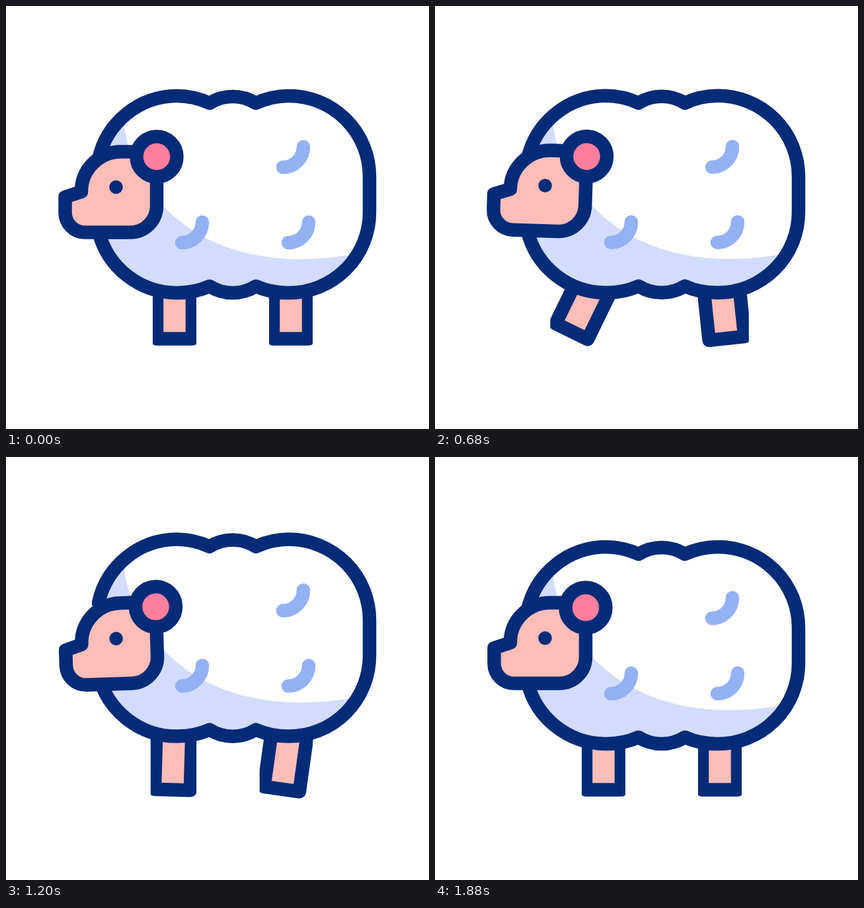
Recreate the animation shown at these times as an HTML page with a canvas. Size 640 px wide and 640 px high, loop 2000 ms.

```html
<!DOCTYPE html>
<html lang="en">
<head>
<meta charset="utf-8">
<title>Running sheep</title>
<style>
html, body { margin: 0; width: 100%; height: 100%; overflow: hidden; background: #fff; }
canvas { display: block; }
</style>
</head>
<body>
<canvas id="stage" width="640" height="640"></canvas>
<script>
const ctx = document.getElementById('stage').getContext('2d');
const NAVY = '#042b77', SKIN = '#fdbdb8', EAR = '#fe7f9f', SHADE = '#d2dcfd', CURL = '#94b1f4';
const LOOP = 2000, STEP = 40, LINE = 20.5;
const STRIDE = 600, SETOFF = 200, SETTLE = 1400, REST = 1880;

const bodyFill = new Path2D(`M140 341 A122 122 0 0 0 258 434 A122 122 0 0 0 308 424
  A66 66 0 0 0 378 424 A122 122 0 0 0 428 434 A122 122 0 0 0 550 312 V258
  A122 122 0 0 0 428 136 A122 122 0 0 0 378 147 A66 66 0 0 0 308 147
  A122 122 0 0 0 258 136 A122 122 0 0 0 140 232`);
const bodyLine = new Path2D('M140 305 V341');
bodyLine.addPath(bodyFill);
const shade = new Path2D(`M177 130 L178 170 C183 262 266 383 445 383
  C474 383 503 380 530 375 L560 460 H120 V130 Z`);
const curl = new Path2D('M31 0 A31 31 0 0 1 0 31');
const face = new Path2D(`M89.5 289 L114 281 A60 60 0 0 1 174 220.5 H228 V303
  A40 40 0 0 1 188 342.5 H119.5 A30 30 0 0 1 89.5 312.5 Z`);

// Rises from 0 to 1 and back once per stride
function hump(phase, start, length, power = 2) {
  const u = ((phase - start + STRIDE) % STRIDE) / length;
  return u < 1 ? Math.sin(Math.PI * u) ** power : 0;
}

// The gallop repeats each stride; it grows out of rest and fades back into it
function poseAt(t) {
  const phase = Math.min(SETTLE, Math.max(SETOFF, t)) % STRIDE;
  const strength = Math.max(0, Math.min(1, t / SETOFF, (REST - t) / (REST - SETTLE)));
  return {
    bodyY: strength * (39.5 * hump(phase, -22, 554) - 12),
    headTurn: strength * (15.8 * hump(phase, -5, 520) - 2),
    headY: strength * -12 * hump(phase, 355, 280),
    front: strength * 47 * hump(phase, -5, 455, 1),
    back: strength * (8 - 47 * hump(phase, 11, 375))
  };
}

function paint(path, fill) {
  ctx.fillStyle = fill;
  ctx.fill(path);
  ctx.stroke(path);
}

function disc(x, y, r, fill, outlined) {
  const path = new Path2D();
  path.arc(x, y, r, 0, 2 * Math.PI);
  ctx.fillStyle = fill;
  ctx.fill(path);
  if (outlined) ctx.stroke(path);
}

function leg(x, y, length, degrees) {
  const half = 27, a = degrees * Math.PI / 180;
  const wide = half * Math.cos(a), reach = length * Math.sin(a);
  // The outline is trimmed by upright edges at either side
  const pad = 6 + Math.abs(degrees) * 0.08;
  const left = x - wide - Math.max(0, reach) - pad;
  const right = x + wide + Math.max(0, -reach) + pad;
  const shape = new Path2D();
  shape.rect(-half, 0, 2 * half, length);
  ctx.save();
  ctx.beginPath();
  ctx.rect(left, 0, right - left, 640);
  ctx.clip();
  ctx.translate(x, y);
  ctx.rotate(a);
  paint(shape, SKIN);
  ctx.restore();
}

function drawCurl(x, y) {
  ctx.save();
  ctx.translate(x, y);
  ctx.strokeStyle = CURL;
  ctx.stroke(curl);
  ctx.restore();
}

function body(y) {
  ctx.save();
  ctx.translate(0, y);
  ctx.fillStyle = '#fff';
  ctx.fill(bodyFill);
  ctx.save();
  ctx.clip(bodyFill);
  ctx.fillStyle = SHADE;
  ctx.fill(shade);
  ctx.restore();
  ctx.stroke(bodyLine);
  drawCurl(419, 213);
  drawCurl(266, 327);
  drawCurl(427, 327);
  ctx.restore();
}

function head(y, degrees) {
  ctx.save();
  ctx.translate(238 - y * 0.1, 277 + y);
  ctx.rotate(degrees * Math.PI / 180);
  ctx.translate(-238, -277);
  paint(face, SKIN);
  disc(228, 228, 30.5, EAR, true);
  disc(166.5, 274, 10.3, NAVY);
  ctx.restore();
}

function draw(now) {
  const pose = poseAt(Math.floor(now % LOOP / STEP) * STEP);
  ctx.clearRect(0, 0, 640, 640);
  ctx.lineWidth = LINE;
  ctx.lineCap = ctx.lineJoin = 'round';
  ctx.strokeStyle = NAVY;
  leg(255, 393.5, 110, pose.front);
  leg(431, 403.5, 100, pose.back);
  body(pose.bodyY);
  head(pose.headY, pose.headTurn);
}

const start = performance.now();
function tick() {
  draw(performance.now() - start);
  requestAnimationFrame(tick);
}
tick();
</script>
</body>
</html>
```
